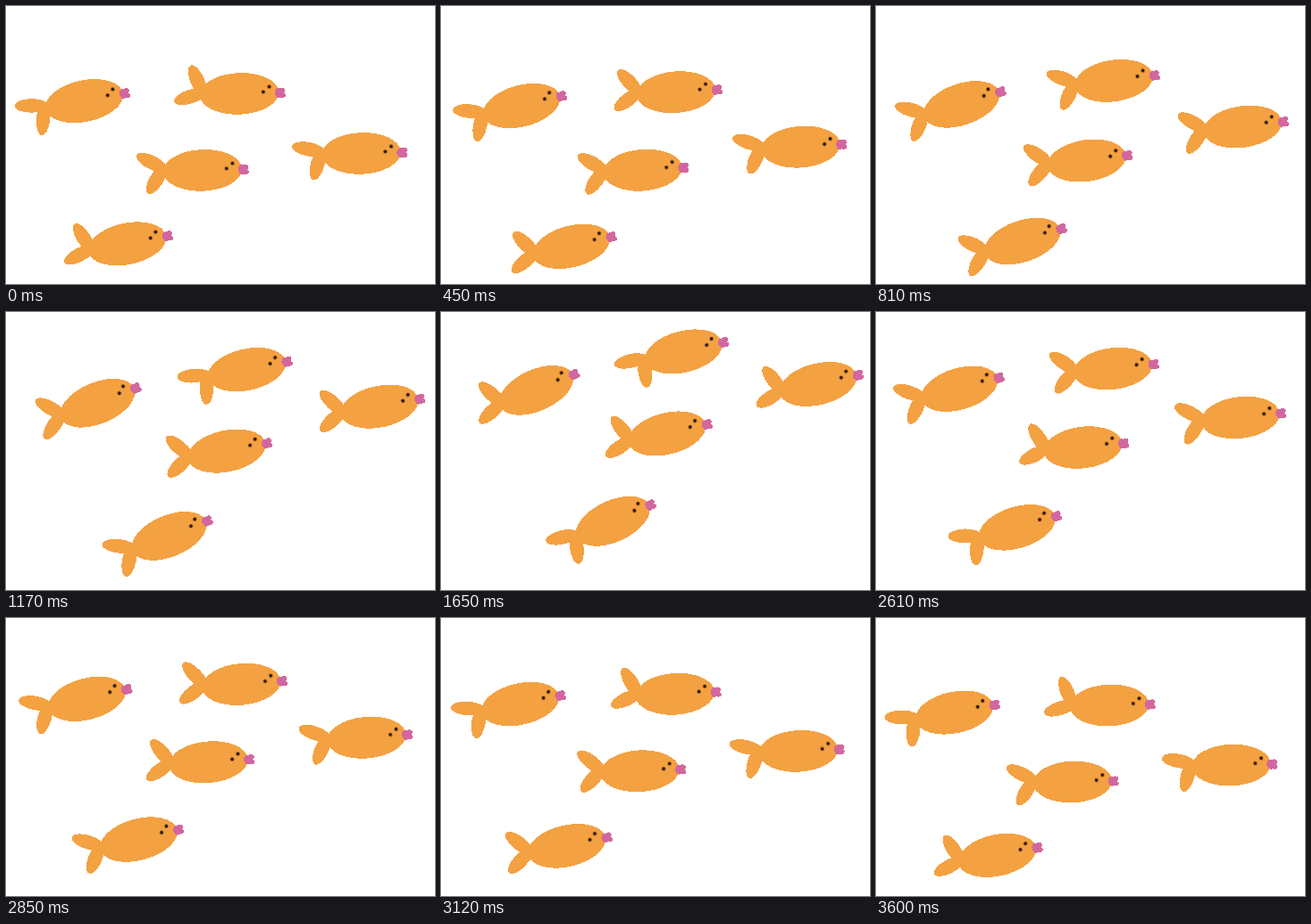
An HTML page that plays this animation: 480 by 312 pixels, repeating every 3.63 s.

```html
<!DOCTYPE html>
<html lang="en">
<head>
<meta charset="utf-8">
<title>Five fish</title>
<style>
  html, body { margin: 0; width: 100%; height: 100%; overflow: hidden; background: #fff; }
  svg { display: block; width: 480px; height: 312px; }
</style>
</head>
<body>
<svg id="sea" viewBox="0 0 480 312" xmlns="http://www.w3.org/2000/svg"></svg>
<script>
const LOOP = 3630, STEP = 30;
const TIMES = [0, 450, 1170, 1650, 2610, 3120];

// Poses at TIMES: body centre x and y, upward tilt and tail swing in degrees
const POSES = [
  { x: [88, 90, 102.5, 106.5, 93.5, 88.5], y: [106, 112.5, 102, 88, 86, 97],
    tilt: [11.8, 14.8, 22.5, 24, 16.8, 12.8], tail: [-25.6, -17.4, 14.5, 28.6, -2.4, -21] },
  { x: [261, 263, 269.5, 271.5, 265, 262], y: [98, 97, 64.5, 44.5, 63.5, 85.5],
    tilt: [2.5, 4.4, 12.5, 14, 7.2, 3.8], tail: [32, 14.5, -29.5, -36, 4, 25.4] },
  { x: [220, 225.5, 247, 253, 231.5, 222.5], y: [184, 184.5, 156, 136.5, 152, 172],
    tilt: [2.5, 4.5, 12.2, 14, 7, 3.3], tail: [-7, -4.5, 15.5, 26.8, 28, 2] },
  { x: [397.5, 402.5, 418, 422, 407.5, 400], y: [165, 158.5, 106, 81, 118.5, 149.5],
    tilt: [2.5, 4.5, 12, 13.8, 7, 3.4], tail: [-25, -15, 16.5, 29, -4, -21] },
  { x: [135.5, 146, 182.5, 192.5, 157.5, 141], y: [266, 270.5, 251, 235, 241.5, 256.5],
    tilt: [11.8, 14.8, 22.5, 24.5, 17, 13.3], tail: [29, 23.4, -10, -24.5, -23, 16] }
];

const LIPS = "M-6 -1C-5.5 -5.5 -2 -5.8 0 -5C2 -6.3 5.5 -5.5 5.8 -3.2C6.2 -1.5 5 -.8 4.2 0" +
  "C6 1 6.4 3 5.5 4.5C4 6 2 5.6 0 5C-2 6 -4.8 5.5 -5 3C-6.3 2 -6.3 0 -6 -1Z";

function wave(t) {
  const a = 2 * Math.PI * t / LOOP;
  return [1, Math.cos(a), Math.sin(a), Math.cos(2 * a), Math.sin(2 * a)];
}

// Least-squares periodic curve of two harmonics; the second is lightly damped
function fit(values) {
  const n = 5, rows = TIMES.map(wave);
  const m = Array.from({ length: n }, (_, i) => {
    const row = Array.from({ length: n }, (_, j) => rows.reduce((s, r) => s + r[i] * r[j], 0));
    if (i > 2) row[i] += 0.15;
    row.push(rows.reduce((s, r, k) => s + r[i] * values[k], 0));
    return row;
  });
  for (let i = 0; i < n; i++) {
    const p = m[i][i];
    m[i] = m[i].map(v => v / p);
    for (let k = 0; k < n; k++) {
      if (k === i) continue;
      const f = m[k][i];
      m[k] = m[k].map((v, j) => v - f * m[i][j]);
    }
  }
  return m.map(r => r[n]);
}

const dot = (a, b) => a.reduce((s, v, i) => s + v * b[i], 0);

const eye = (x, y) =>
  `<circle cx="${x}" cy="${y}" r="2.5" fill="#8a5522" opacity=".6"/>` +
  `<circle cx="${x}" cy="${y}" r="1.7" fill="#2c1a0c"/>`;

const fin = angle =>
  `<ellipse cx="14.3" rx="19" ry="7.8" transform="translate(-1 4) rotate(${angle})"/>`;

const sea = document.getElementById("sea");

const school = POSES.map(pose => {
  const g = document.createElementNS(sea.namespaceURI, "g");
  g.innerHTML =
    `<g fill="#f4a142" shape-rendering="crispEdges">
      <g class="tail">${fin(37.3)}${fin(-47.3)}</g>
      <ellipse rx="44.2" ry="23.3"/>
    </g>
    ${eye(26.8, -0.9)}${eye(33.7, -6.4)}
    <path d="${LIPS}" transform="translate(45.8 1)" fill="#d2679f" shape-rendering="crispEdges"/>`;
  sea.append(g);
  const curves = {};
  for (const key in pose) curves[key] = fit(pose[key]);
  return { g, tail: g.querySelector(".tail"), curves };
});

function draw(t) {
  const w = wave(t);
  for (const { g, tail, curves } of school) {
    const at = key => dot(curves[key], w).toFixed(2);
    g.setAttribute("transform", `translate(${at("x")} ${at("y")}) rotate(${-at("tilt")})`);
    tail.setAttribute("transform", `translate(-44 0) rotate(${180 + +at("tail")})`);
  }
}

function tick() {
  draw(Math.floor(performance.now() % LOOP / STEP) * STEP);
  requestAnimationFrame(tick);
}
tick();
</script>
</body>
</html>
```
